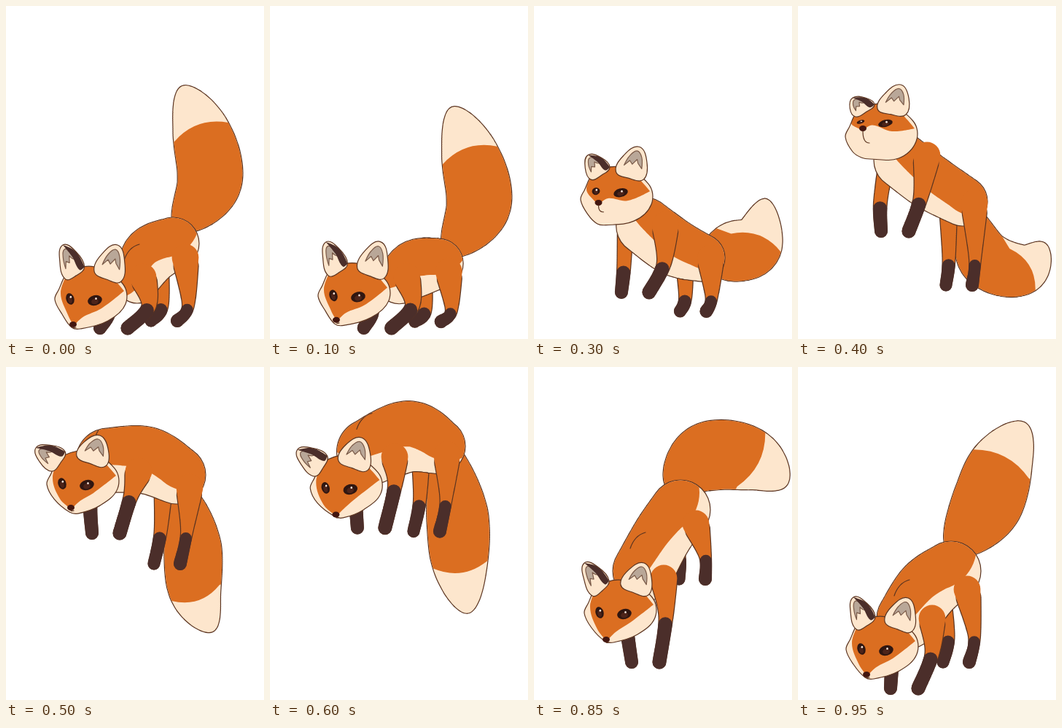
An HTML page with a canvas for the animation above (1000 ms loop, 354 by 457 pixels).

```html
<!DOCTYPE html>
<html lang="en">
<head>
<meta charset="utf-8">
<title>Jumping fox</title>
<style>
html, body { margin: 0; width: 100%; height: 100%; overflow: hidden; background: #fff; }
canvas { display: block; width: 354px; height: 457px; }
</style>
</head>
<body>
<canvas id="stage" width="354" height="457"></canvas>
<script>
const ctx = document.getElementById('stage').getContext('2d');
const ORANGE = '#db6e21', CREAM = '#fde6cd', SOCK = '#4b2e2a', LINE = '#5b3420',
      INNER = '#b9a798', EYE = '#2f1611', NOSE = '#43160f';
const STEPS = 19;

// Key poses as a small skeleton.
// head: point between the eyes, then nose, far ear tip, near ear tip relative to it
// body: chest, middle, rump as x,y,radius   tail: root, bulge, colour edge, tip
// hind, fore: joint, cuff, paw of the near leg
const poses = [
  { at: 0, head: '105,403 -13,34 -27,-75 48,-75', body: '180,380,28 198,343,39 229,326,36',
    tail: '243,297 279,242 268,173 242,112', bulk: '45',
    hind: '246,345 250,411 235,432', fore: '188,372 196,412 167,442' },
  { at: 3, head: '101,369 -13,25 -28,-70 46,-73', body: '165,362,40 203,378,40 233,384,32',
    tail: '258,370 293,317 297,261 285,196', bulk: '45',
    hind: '243,385 245,424 234,434', fore: '185,365 191,407 165,441' },
  { at: 7, head: '103,160 -14,8 -28,-34 38,-52', body: '142,212,38 182,242,38 226,268,34',
    tail: '235,285 257,346 308,362 337,328', bulk: '39',
    hind: '242,270 243,348 239,383', fore: '177,205 168,264 152,309' },
  { at: 9, head: '94,161 -5,32 -53,-50 35,-67', body: '140,128,44 192,128,46 234,148,40',
    tail: '247,175 256,245 260,310 283,361', bulk: '40',
    hind: '252,165 248,227 239,270', fore: '182,143 171,178 156,228' },
  { at: 13, head: '93,181 -2,37 -57,-56 31,-71', body: '135,112,46 185,82,50 222,92,36',
    tail: '228,80 257,165 263,230 267,285', bulk: '46',
    hind: '230,100 235,164 227,206', fore: '160,115 172,156 160,218' },
  { at: 16, head: '107,338 -8,36 -38,-69 44,-69', body: '150,280,42 176,232,41 201,196,41',
    tail: '195,158 238,123 298,127 343,160', bulk: '48',
    hind: '222,215 235,260 235,291', fore: '178,290 181,343 172,405' },
  { at: 18, head: '104,388 -10,34 -28,-72 47,-71', body: '150,345,42 178,305,44 210,280,41',
    tail: '218,245 257,192 279,133 310,80', bulk: '49',
    hind: '232,305 242,370 235,405', fore: '184,345 184,393 165,441' }
];

const parts = Object.keys(poses[0]).filter(k => k !== 'at');
for (const p of poses)
  for (const k of parts) p[k] = p[k].split(' ').map(s => s.split(',').map(Number));

const count = poses.length;
const pose = i => poses[(i + count) % count];
const keyAt = i => pose(i).at + Math.floor(i / count) * STEPS;
const lerp = (a, b, u) => a + (b - a) * u;
const mix = (p, q, u) => p.map((v, d) => lerp(v, q[d], u));
const add = (p, x, y) => [p[0] + x, p[1] + y, ...p.slice(2)];

// Monotone cubic through four neighbouring keys
function blend(v, t, s) {
  const slope = i => (v[i + 1] - v[i]) / (t[i + 1] - t[i]);
  const a = slope(0), b = slope(1), c = slope(2);
  const tangent = (m, n) => m * n > 0 ? 2 * m * n / (m + n) : 0;
  const h = t[2] - t[1], u = (s - t[1]) / h, w = 1 - u;
  return v[1] * w * w * (1 + 2 * u) + v[2] * u * u * (3 - 2 * u)
    + h * u * w * (w * tangent(a, b) - u * tangent(b, c));
}

function poseAt(step) {
  let i = count - 1;
  while (poses[i].at > step) i--;
  const near = [i - 1, i, i + 1, i + 2], times = near.map(keyAt), keys = near.map(pose);
  const out = {};
  for (const k of parts)
    out[k] = keys[0][k].map((pt, n) => pt.map((_, d) => blend(keys.map(p => p[k][n][d]), times, step)));
  return out;
}

// Point at u in 0..1 on a smooth curve through pts
function along(pts, u) {
  const n = pts.length - 1, i = Math.min(n - 1, Math.floor(u * n)), s = u * n - i;
  const [p, q] = [pts[i], pts[i + 1]], a = pts[i - 1] || p, b = pts[i + 2] || q;
  return p.map((v, d) => {
    const m = (q[d] - a[d]) / 2, k = (b[d] - v) / 2, w = 1 - s;
    return v * w * w * (1 + 2 * s) + q[d] * s * s * (3 - 2 * s) + s * w * (w * m - s * k);
  });
}

// Union of discs [x, y, r] given by a function of u
function discs(at, grow = 0, from = 0, to = 1) {
  const path = new Path2D(), n = 70;
  for (let i = 0; i <= n; i++) {
    const [x, y, r] = at(lerp(from, to, i / n)), size = Math.max(0.1, r + grow);
    path.moveTo(x + size, y);
    path.arc(x, y, size, 0, 7);
  }
  return path;
}

// Smooth closed path; the listed point indices stay sharp
function loop(pts, corners = []) {
  const n = pts.length, path = new Path2D(), get = i => pts[(i + n) % n];
  const handle = (i, len) => {
    if (corners.includes(i % n)) return [0, 0];
    const [a, b] = [get(i - 1), get(i + 1)], x = b[0] - a[0], y = b[1] - a[1];
    const k = len * 0.35 / (Math.hypot(x, y) || 1);
    return [x * k, y * k];
  };
  path.moveTo(...pts[0]);
  for (let i = 0; i < n; i++) {
    const p = get(i), q = get(i + 1), len = Math.hypot(q[0] - p[0], q[1] - p[1]);
    const a = handle(i, len), b = handle(i + 1, len);
    path.bezierCurveTo(p[0] + a[0], p[1] + a[1], q[0] - b[0], q[1] - b[1], q[0], q[1]);
  }
  return path;
}

function paint(path, fill, stroke) {
  if (fill) { ctx.fillStyle = fill; ctx.fill(path); }
  if (stroke) { ctx.strokeStyle = stroke; ctx.stroke(path); }
}

function clipped(path, draw) {
  ctx.save();
  ctx.clip(path);
  draw();
  ctx.restore();
}

function oval([x, y], rx, ry, tilt, fill) {
  const path = new Path2D();
  path.ellipse(x, y, rx, ry, tilt, 0, 7);
  paint(path, fill);
}

function drawTail(pts, bulk) {
  const at = u => {
    const swell = lerp(.3, 1, Math.sin(Math.min(1, u / .4) * Math.PI / 2));
    const taper = 1 - Math.max(0, (u - .4) / .6) ** 2.5;
    return [...along(pts, u), bulk * swell * taper];
  };
  paint(discs(at, .6), LINE);
  paint(discs(at, -.6), CREAM);
  // Orange up to an edge that bows toward the tip
  const [x, y, r] = at(.667), [fx, fy] = at(.75);
  const fur = new Path2D();
  ctx.save();
  ctx.translate(x, y);
  ctx.rotate(Math.atan2(fy - y, fx - x));
  fur.moveTo(-300, -300);
  fur.lineTo(0, -300);
  fur.lineTo(0, -r);
  fur.quadraticCurveTo(22, 0, 0, r);
  fur.lineTo(0, 300);
  fur.lineTo(-300, 300);
  ctx.clip(fur);
  ctx.setTransform(1, 0, 0, 1, 0, 0);
  paint(discs(at, -.6), ORANGE);
  ctx.restore();
}

function drawLeg(joints, radii) {
  const pts = joints.map((p, i) => [p[0], p[1], radii[i]]);
  const at = u => along(pts, u);
  paint(discs(at, .6, .12), LINE);
  paint(discs(at, -.6), ORANGE);
  paint(discs(at, .4, .58), SOCK);
}

function drawBody(pts) {
  const at = u => along(pts, u);
  // Back fur: large discs pushed toward the back leave the cream underside free
  const back = u => {
    const [x, y, r] = at(u), a = at(Math.max(0, u - .05)), b = at(Math.min(1, u + .05));
    const dx = b[0] - a[0], dy = b[1] - a[1], len = Math.hypot(dx, dy) || 1;
    return [x + dy / len * r, y - dx / len * r, r * lerp(1.1, 1.45, u)];
  };
  paint(discs(at, .6), LINE);
  paint(discs(at, -.6), CREAM);
  clipped(discs(at, -.6), () => {
    paint(discs(back), ORANGE);
    const [x, y] = pts[0], crease = new Path2D();
    crease.moveTo(x - 18, y - 31);
    crease.quadraticCurveTo(x - 12, y - 49, x + 3, y - 53);
    paint(crease, null, LINE);
  });
}

function drawEar(l, r, tip, far) {
  const mid = mix(l, r, .5);
  const at = (u, v) => [0, 1].map(d => l[d] + (r[d] - l[d]) * u + (tip[d] - mid[d]) * v);
  const right = at(.92, .58);
  const path = loop([l, at(.08, .58), tip, right, r, at(.5, -.1)]);
  paint(path, CREAM);
  clipped(path, () => {
    const tuft = [[.2, .28], [.28, .62], [.48, .85], [.7, .68], [.82, .32],
                  [.64, .46], [.57, .58], [.46, .38], [.34, .48]];
    paint(loop(tuft.map(p => at(...p)), [0, 4, 5, 6, 7, 8]), INNER, '#7a5a48');
    if (far) paint(loop([tip, right, r, at(.75, 0), at(.68, .5)], [0, 2]), SOCK);
  });
  paint(path, null, LINE);
}

function drawEye(c, rx, ry, tilt) {
  oval(c, rx, ry, tilt, EYE);
  oval(add(c, 0, ry * .2), rx * .5, ry * .55, tilt, '#4d241a');
  oval(add(c, rx * .15, -ry * .35), 1.3, Math.min(1.5, ry * .3), 0, '#f7e6dc');
}

function drawHead([eye, nose, farTip, tip]) {
  const [nx, ny] = nose;
  const up = Math.max(0, (34 - ny) / 26) ** 2;   // 1 with the muzzle raised
  const lift = 20 * up, farTurn = farTip[0] + 28, turn = tip[0] - 48;
  const place = pts => pts.map(([x, y]) => add(eye, x, y));

  const skull = loop(place([[-19, -37 + lift], [-33, -13 + lift], [-38, lift], [-28, 20 + lift],
    [nx - 2, 38 + lift / 2], [nx + 10, 40 + lift / 2], [35, 29 + lift], [59, 6 + lift],
    [55, -22 + lift], [17, -45 + lift]]));
  const mask = loop(place([[-18, -40 + lift], [-30, -10 + lift / 2], [-20, ny / 2 + 4],
    [nx + 1, ny + 2], [nx + 13, ny * .8 - 3], [26, 12], [57, -12 + lift], [17, -48 + lift]]), [0, 3, 6]);
  paint(skull, CREAM);
  clipped(skull, () => paint(mask, ORANGE));
  paint(skull, null, LINE);

  drawEar(...place([[-24 + farTurn * .3, -28 - farTurn * .4 + lift],
    [2 + farTurn * .6, -45 + lift], farTip]), true);
  drawEar(...place([[16 + turn, -39 + lift], [53 + turn * .8, -25 + lift * .7], tip]), false);

  drawEye(add(eye, -17, -1), 5.5, 8 * (1 - .7 * up), -.3);
  drawEye(add(eye, 17, 1), 10, 7 * (1 - .3 * up), -.25);
  const [x, y] = add(eye, nx, ny), mouth = new Path2D();
  oval([x, y], 5, 4, 0, NOSE);
  mouth.moveTo(x, y + 4);
  mouth.quadraticCurveTo(x, y + 5 + 15 * up, x + 4 + 5 * up, y + 4 + 16 * up);
  paint(mouth, null, LINE);
}

function draw({ head, body, tail, bulk, hind, fore }) {
  ctx.fillStyle = '#fff';
  ctx.fillRect(0, 0, 354, 457);
  ctx.lineWidth = 1.2;
  ctx.lineJoin = ctx.lineCap = 'round';
  const [hip, cuff, paw] = fore;
  drawTail(tail, bulk[0][0]);
  drawLeg(hind.map(p => add(p, -36, 0)), [13, 9, 8]);
  drawLeg([add(hip, -55, 5), add(cuff, -55, 6), add(paw, -38, 0)], [11, 9.5, 8.5]);
  drawBody(body);
  drawLeg(hind, [19, 8.5, 8.5]);
  drawLeg(fore, [19, 10, 9]);
  drawHead(head);
}

let shown = -1;
const start = performance.now();
function tick() {
  const t = (performance.now() - start) % 1000;
  const step = Math.max(0, Math.floor(t / 50) - 1);
  if (step !== shown) draw(poseAt(shown = step));
  requestAnimationFrame(tick);
}
tick();
</script>
</body>
</html>
```
